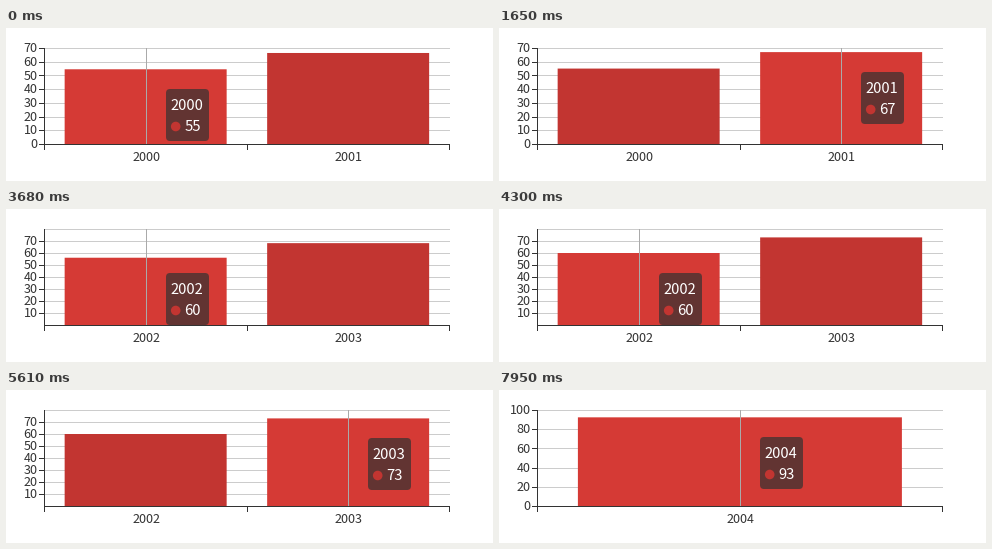
A matplotlib script that plays this animation: 487x153 px, repeating every 8 s.

```python
import numpy as np
import matplotlib.pyplot as plt
from matplotlib.animation import FuncAnimation
from matplotlib.patches import Circle, FancyBboxPatch, Rectangle

W, H, DPI = 487, 153, 64
LOOP, STEP, HOLD = 8000, 20, 77
LEFT, TOP, WIDTH, BASE = 38.4, 20, 405, 116
RED, LIT = "#c23531", "#d53a35"
INK, GRID, POINTER = "#333333", "#cccccc", "#aaaaaa"
FONT = "Noto Sans CJK JP"

# start time, axis maximum, labelled ticks, gridlines, values by year
SCENES = [
    (-680, 70, range(0, 71, 10), range(10, 71, 10), {2000: 55, 2001: 67}),
    (3282, 80, range(10, 71, 10), range(10, 81, 10), {2002: 60, 2003: 73}),
    (7225, 100, range(0, 101, 20), range(20, 101, 20), {2004: 93}),
]
# first shown, year, start of the pointer move, start of the tooltip move
HOVERS = [
    (-7, 2000, -700, -700),
    (1270, 2001, 1251, 1253),
    (3290, 2002, 3290, 3290),
    (5230, 2003, 5219, 5230),
    (7250, 2004, 7224, 7233),
]

fig = plt.figure(figsize=(W / DPI, H / DPI), dpi=DPI, facecolor="white")
ax = fig.add_axes([0, 0, 1, 1])
ax.set_xlim(0, W)
ax.set_ylim(H, 0)
ax.axis("off")
live = []


def progress(t, start, length):
    return min(max((t - start) / length, 0), 1)


def expo_out(p):
    return 1 if p >= 1 else 1 - 2 ** (-10 * p)


def cubic_out(p):
    return 1 - (1 - p) ** 3


S = np.linspace(0, 1, 201)
BEZIER_X = 3 * (1 - S) ** 2 * S * 0.23 + 3 * (1 - S) * S**2 * 0.32 + S**3
BEZIER_Y = 3 * (1 - S) ** 2 * S + 3 * (1 - S) * S**2 + S**3


def css_ease(p):
    return float(np.interp(p, BEZIER_X, BEZIER_Y))


def mix(a, b, p):
    return a + (b - a) * p


def add(patch):
    live.append(ax.add_patch(patch))


def rect(x, y, w, h, color, z):
    add(Rectangle((x, y), w, h, fc=color, lw=0, snap=False, zorder=z))


def text(x, y, s, size, color, ha, z=1):
    """Digits centred vertically on y, size in pixels."""
    live.append(ax.text(x, y + 0.366 * size, s, fontsize=size * 72 / DPI,
                        family=FONT, color=color, ha=ha, va="baseline",
                        zorder=z))


def center(i, n):
    return LEFT + WIDTH * (i + 0.5) / n


def anchor(year):
    """Band centre, bar top and value of a year at rest."""
    for _, peak, _, _, data in SCENES:
        if year in data:
            x = center(list(data).index(year), len(data))
            return x, BASE - (BASE - TOP) * data[year] / peak, data[year]


def latest(rows, t):
    i = max(k for k, row in enumerate(rows) if row[0] <= t)
    return rows[i], rows[max(i - 1, 0)]


def draw_axes(scene, prev, p):
    _, peak, ticks, lines, data = scene
    scale = mix(1 / prev[1], 1 / peak, p)

    def level(v):
        return TOP if v == peak else BASE - (BASE - TOP) * v * scale

    for v in lines:
        rect(38, round(level(v)), 406, 1, GRID, 0)
    for v in ticks:
        y = level(v)
        rect(33, round(y), 5, 1, INK, 1)
        text(31.5, y - 0.5, str(v), 12.6, INK, "right")
    rect(38, TOP, 1, BASE - TOP + 1, INK, 1)
    rect(38, BASE, 406, 1, INK, 1)

    n = len(data)
    for i in range(n + 1):
        rect(round(LEFT + WIDTH * i / n), BASE, 1, 6, INK, 1)
    for i, year in enumerate(data):
        x = mix(center(i, len(prev[4])), center(i, n), p)
        text(x + 0.4, 128.5, str(year), 12.6, INK, "center")


def draw_bars(scene, prev, t, focus):
    start, _, _, _, data = scene
    shrink = 1 - cubic_out(progress(t, start, 300))
    if prev is not scene and shrink > 0:
        band = 0.8 * WIDTH / len(prev[4])
        for year in prev[4]:
            x, y, _ = anchor(year)
            color = LIT if year == max(prev[4]) else RED
            rect(x - band / 2, y, band * shrink, BASE - y, color, 2)

    grow = expo_out(progress(t, start, 1000))
    band = 0.8 * WIDTH / len(data)
    for year in data:
        x, y, _ = anchor(year)
        h = (BASE - y) * grow
        rect(x - band / 2, BASE - h, band, h, LIT if year == focus else RED, 3)


def draw_tooltip(x, y, year, value):
    add(FancyBboxPatch((x, y), 43, 52, boxstyle="round,pad=0,rounding_size=4",
                       fc=(50 / 255,) * 3, alpha=0.7, lw=0, zorder=5))
    add(Circle((x + 9.7, y + 37.5), 4.8, fc=RED, lw=0, zorder=6))
    text(x + 4.5, y + 16, str(year), 14.7, "white", "left", 6)
    text(x + 18.3, y + 37, str(value), 14.7, "white", "left", 6)


def draw(i):
    while live:
        live.pop().remove()
    t = i * STEP + STEP / 2
    hover, last = latest(HOVERS, t)
    shown, year, line_start, tip_start = hover
    t = shown + (t - shown) // HOLD * HOLD
    scene, prev = latest(SCENES, t)

    draw_axes(scene, prev, cubic_out(progress(t, scene[0], 300)))
    draw_bars(scene, prev, t, year if t > line_start else None)

    x0, y0, _ = anchor(last[1])
    x1, y1, value = anchor(year)
    px = mix(x0, x1, expo_out(progress(t, line_start, 200)))
    rect(round(px), TOP, 1, BASE - TOP, POINTER, 4)
    p = css_ease(progress(t, tip_start, 400))
    draw_tooltip(round(mix(x0, x1, p) + 20), round(mix(y0, y1, p) + 20),
                 year, value)
    return live


anim = FuncAnimation(fig, draw, frames=LOOP // STEP, interval=STEP,
                     init_func=lambda: live, repeat=True, repeat_delay=0)
plt.show()
```
